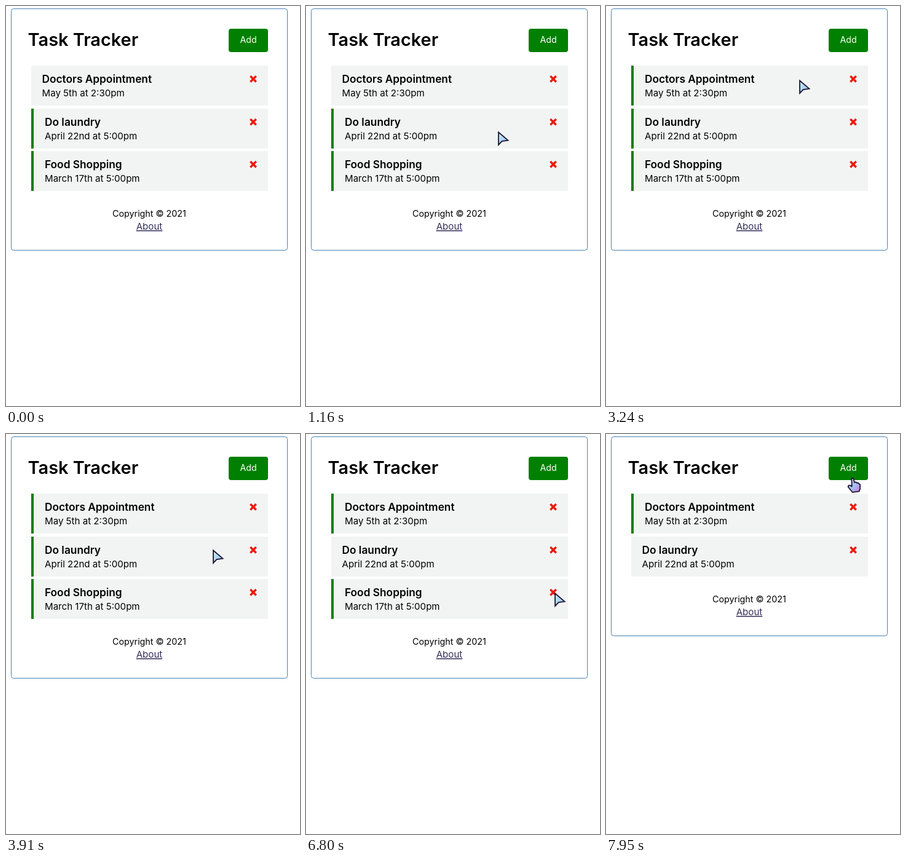
An HTML page for the animation above (8000 ms loop, 478x651 px).

```html
<!DOCTYPE html>
<html lang="en">
<head>
<meta charset="utf-8">
<title>Task Tracker</title>
<style>
  html, body { margin: 0; width: 100%; height: 100%; overflow: hidden; background: #fff; }
  svg { display: block; width: 478px; height: 651px; }
  text { font: 400 15.1px Inter, sans-serif; font-optical-sizing: none; fill: #000; }
  .heading { font-size: 28.9px; font-weight: 600; }
  .name { font-size: 17.3px; font-weight: 600; }
  .middle { text-anchor: middle; }
  .add { font-size: 14.2px; fill: #fff; }
  .copyright { font-size: 14.3px; }
  .about { text-decoration: underline; fill: #35305a; }
  .cross { stroke: #f01808; stroke-width: 3.5; }
</style>
</head>
<body>
<svg viewBox="0 0 478 651">
  <defs>
    <linearGradient id="tint" x2="1" y2="1">
      <stop stop-color="#d4edfb"/>
      <stop offset=".55" stop-color="#a6d2f4"/>
      <stop offset="1" stop-color="#c9a6e4"/>
    </linearGradient>
    <linearGradient id="dusk" x2="1" y2="1">
      <stop offset=".2" stop-color="#d3b4ec"/>
      <stop offset=".5" stop-color="#9fc8f4"/>
      <stop offset=".8" stop-color="#c08fe0"/>
    </linearGradient>
  </defs>
  <rect id="card" x="8.5" y="4.5" width="449" rx="4" fill="#fff" stroke="#4682b4"/>
  <text class="heading" x="35.6" y="65">Task Tracker</text>
  <rect x="362" y="37" width="64" height="38" rx="4" fill="green"/>
  <text class="add middle" x="394" y="60">Add</text>
  <g id="rows"></g>
  <g id="footer">
    <text class="middle copyright" x="233" y="343">Copyright © 2021</text>
    <text class="middle about" x="233" y="364">About</text>
  </g>
  <g id="cursor" fill="url(#tint)" stroke="#1b1730" stroke-width="1.8">
    <path id="arrow" d="M1 1.5V22L6.6 16.2L16.5 14.6Z"/>
    <path id="hand" fill="url(#dusk)" stroke-linejoin="round"
      d="M-.8 1L2.2 .8L4 8L6.5 7.2L8 8.8L10.3 8.4L11.5 10.2L13 11L13.2 18L11.6 22.4L.6 23.8L-6.4 15L-5.6 12.6L-3 12.6L-.2 14.6Z"/>
  </g>
</svg>
<script>
const LOOP = 8000, REMOVED = 7130, ROW_STEP = 69;
const $ = id => document.getElementById(id);

// Each task is reminded or not, and flips at its toggle time.
const tasks = [
  { y: 97, name: 'Doctors Appointment', date: 'May 5th at 2:30pm', reminder: false, toggle: 3100 },
  { y: 167, name: 'Do laundry', date: 'April 22nd at 5:00pm', reminder: true, toggle: 5250 },
  { y: 236, name: 'Food Shopping', date: 'March 17th at 5:00pm', reminder: true, toggle: Infinity }
];

$('rows').innerHTML = tasks.map(({ y, name, date }) => `
  <g transform="translate(41 ${y})">
    <rect width="385" height="65" fill="#f2f4f4"/>
    <rect class="bar" width="4" height="65" fill="green"/>
    <g class="label"><text class="name" y="28">${name}</text><text y="50">${date}</text></g>
    <path class="cross" d="M356.3 17L365.7 26.4M365.7 17L356.3 26.4"/>
  </g>`).join('');
const rows = [...$('rows').children];

// Pointer stops: time, x, y
const stops = [
  [200, 428, 613], [540, 122, 85], [960, 309, 197], [1010, 309, 197], [1160, 312, 204],
  [1960, 312, 204], [2230, 315, 108], [2400, 315, 108], [2490, 314, 120],
  [3580, 314, 120], [3910, 336, 188], [6200, 336, 188], [6800, 404, 258],
  [7420, 404, 258], [7950, 400, 71], [LOOP, 400, 71]
];

function pointerAt(t) {
  const i = stops.findIndex(stop => stop[0] > t);
  const [t0, x0, y0] = stops[i - 1], [t1, x1, y1] = stops[i];
  const u = (t - t0) / (t1 - t0), k = u * u * (3 - 2 * u);
  return [x0 + (x1 - x0) * k, y0 + (y1 - y0) * k];
}

const show = (el, visible) => { el.style.display = visible ? '' : 'none'; };

function draw(t) {
  const removed = t >= REMOVED, lift = removed ? ROW_STEP : 0;
  tasks.forEach(({ reminder, toggle }, i) => {
    const on = reminder !== (t >= toggle);
    show(rows[i].querySelector('.bar'), on);
    rows[i].querySelector('.label').setAttribute('transform', `translate(${on ? 22 : 17.5} 0)`);
  });
  show(rows[2], !removed);
  $('card').setAttribute('height', 393 - lift);
  $('footer').setAttribute('transform', `translate(0 ${-lift})`);

  const moving = t >= 200;
  show($('cursor'), moving);
  if (!moving) return;
  const [x, y] = pointerAt(t);
  const overButton = removed && y < 75;
  $('cursor').setAttribute('transform', `translate(${x} ${y})`);
  show($('arrow'), !overButton);
  show($('hand'), overButton);
}

const start = performance.now();
function tick() {
  draw((performance.now() - start) % LOOP);
  requestAnimationFrame(tick);
}
tick();
</script>
</body>
</html>
```
